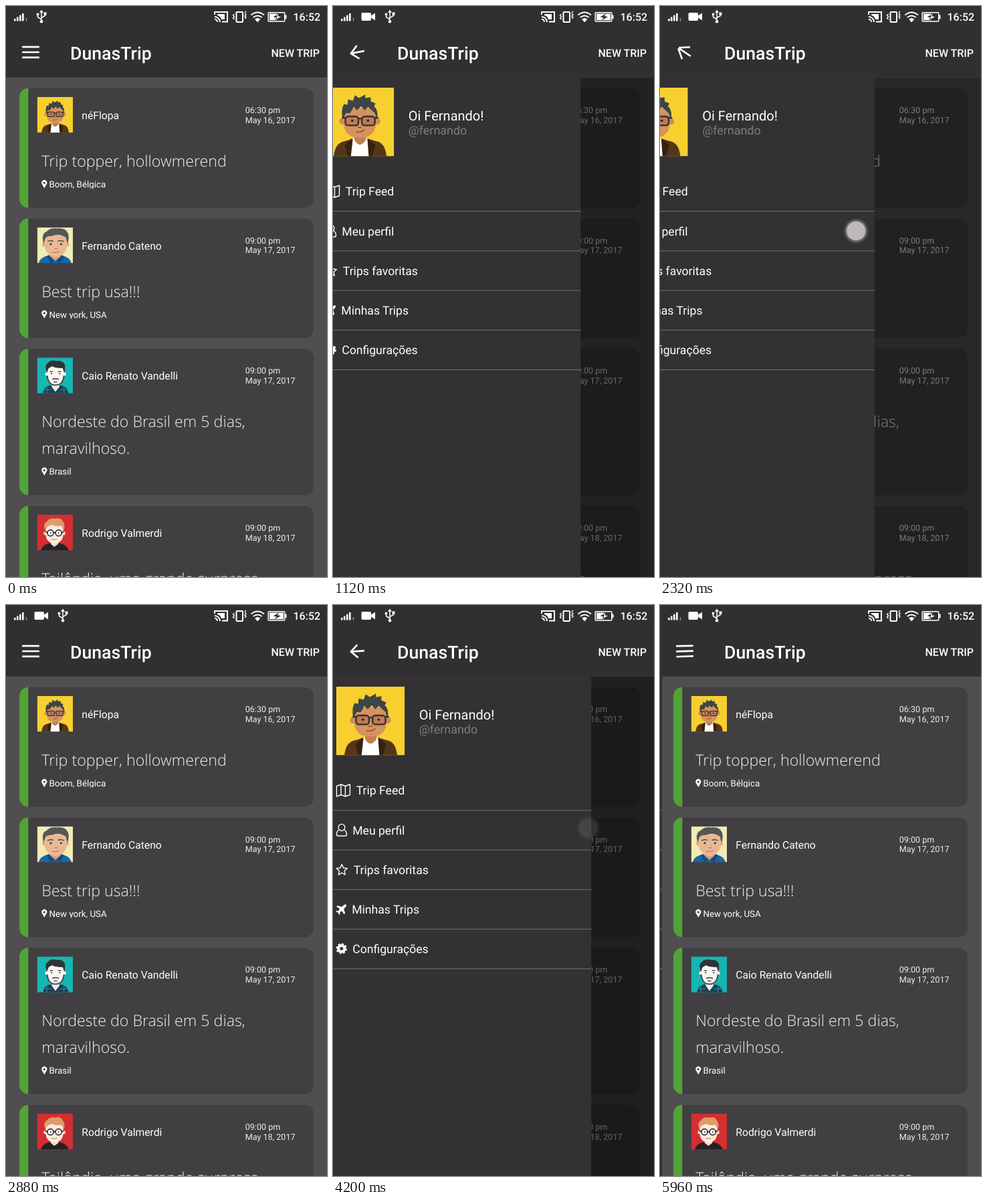
Write an HTML page that moves like this. It is 480x853 px and loops after 6000 ms.

```html
<!DOCTYPE html>
<html lang="pt">
<head>
<meta charset="utf-8">
<title>DunasTrip</title>
<style>
  html, body { margin: 0; width: 100%; height: 100%; overflow: hidden; background: #504e50; }
  svg { font-family: Roboto, sans-serif; fill: #fff; text-rendering: geometricPrecision; }
  body > svg { display: block; width: 480px; height: 853px; }
  .line { fill: none; stroke: #fff; }
  .name { font-size: 15.7px; }
  .date { font-size: 12.6px; fill: #eee; }
  .trip { font: 300 23.2px "Open Sans", sans-serif; fill: #f2f2f2; }
  .place { font-size: 13.33px; }
  .menu { font-size: 17.6px; }
</style>
</head>
<body>
<svg viewBox="0 0 480 853">
  <defs>
    <symbol id="yellow" viewBox="0 0 100 100">
      <path fill="#f7d02f" d="M0 0h100v100H0z"/>
      <path fill="#563619" d="M12 100Q14 80 28 78L42 74H60L74 78Q87 80 89 100Z"/>
      <path fill="#37210f" d="M38 74L28 84 33 100H42ZM62 74L73 84 68 100H59Z"/>
      <path fill="#fff" d="M40 74H61L63 100H37Z"/>
      <path fill="#c47f51" d="M42 64H59V76Q50 90 42 76Z"/>
      <circle cx="25" cy="49" r="5" fill="#cf8b5b"/><circle cx="75" cy="49" r="5" fill="#cf8b5b"/>
      <path fill="#d6925f" d="M26 30H74V50Q73 73 50 73 27 73 26 50Z"/>
      <path fill="#3d4546" d="M25 46Q22 32 27 24L32 25 33 17 40 19 43 11 49 15 58 10 58 15 66 14 66 20 73 23 71 27Q78 34 75 46L72 37 62 28 57 33 52 27 46 33 41 28 36 37 30 37Z"/>
      <g fill="#c07b4d" stroke="#303233" stroke-width="2.4"><rect x="29" y="42" width="19" height="13" rx="4"/><rect x="53" y="42" width="19" height="13" rx="4"/><path d="M48 45h5M24 44h5M72 44h5"/></g>
      <circle cx="39" cy="48" r="1.7" fill="#222"/><circle cx="62" cy="48" r="1.7" fill="#222"/>
      <path fill="none" stroke="#8a4d2c" stroke-width="1.5" d="M47 57q3 2 6 0M44 64q8 2 13-3"/>
    </symbol>
    <symbol id="cream" viewBox="0 0 100 100">
      <path fill="#f0ecb4" d="M0 0h100v100H0z"/>
      <path fill="#1766a8" d="M4 100Q8 84 30 79H70Q92 84 96 100Z"/>
      <path fill="#d99a74" d="M36 72H66V82L51 94 36 82Z"/>
      <path fill="#0f4d86" d="M32 77L49 95 38 100 27 82ZM70 77L53 95 64 100 75 82Z"/>
      <circle cx="20" cy="48" r="6" fill="#e3a983"/><circle cx="83" cy="48" r="6" fill="#e3a983"/>
      <path fill="#eab894" d="M20 22H83V55Q80 76 52 85 24 76 21 55Z"/>
      <path fill="#555759" d="M18 46Q10 18 26 12 36 0 56 3 78 0 86 16 91 28 85 46L80 28Q62 16 42 24 28 24 23 30Z"/>
      <path fill="none" stroke="#4a4a4a" stroke-width="3" d="M29 40q9-5 16-1M58 39q8-4 17 1"/>
      <circle cx="38" cy="47" r="3" fill="#444"/><circle cx="67" cy="47" r="3" fill="#444"/>
      <path fill="none" stroke="#b36f50" stroke-width="2" d="M49 59q4 3 8 0M42 69q11 5 20-2"/>
    </symbol>
    <symbol id="teal" viewBox="0 0 100 100">
      <path fill="#16b6b2" d="M0 0h100v100H0z"/>
      <path fill="#1c4257" d="M16 100Q18 82 34 78H68Q86 82 88 100Z"/>
      <path fill="none" stroke="#3b8698" stroke-width="2" d="M27 82v18M75 82v18M18 90h22M63 90h23"/>
      <path fill="#f4eee9" d="M41 68H62V82L51 96 41 82Z"/>
      <circle cx="27" cy="46" r="5" fill="#f4eee9"/><circle cx="76" cy="46" r="5" fill="#f4eee9"/>
      <path fill="#fbf6f1" d="M28 22H75V50Q74 77 51 78 29 77 28 50Z"/>
      <path fill="#303338" d="M27 42Q19 20 29 16 36 5 54 9 74 7 78 22 79 34 76 42L71 29Q55 31 41 24L32 30Z"/>
      <path fill="none" stroke="#3c3f43" stroke-width="3.5" d="M28 50Q31 77 51 77 72 77 75 50"/>
      <path fill="none" stroke="#34373a" stroke-width="2.5" d="M35 39h9M58 39h9M42 61q9-4 19 0M46 68h10"/>
      <circle cx="40" cy="45" r="2" fill="#333"/><circle cx="63" cy="45" r="2" fill="#333"/>
    </symbol>
    <symbol id="red" viewBox="0 0 100 100">
      <path fill="#d32f33" d="M0 0h100v100H0z"/>
      <path fill="#232225" d="M10 100Q14 84 32 80H64Q84 84 88 100Z"/>
      <path fill="#f6dcc8" d="M38 70H59V82L48 90 38 82Z"/>
      <circle cx="23" cy="52" r="5" fill="#f6dcc8"/><circle cx="74" cy="52" r="5" fill="#f6dcc8"/>
      <path fill="#fcebdd" d="M24 26H73V54Q72 79 48 81 25 79 24 54Z"/>
      <path fill="#df9c6b" d="M23 44Q15 24 27 19 34 8 50 11 66 6 72 19 80 28 74 44L68 31Q52 35 42 28L29 33Z"/>
      <g fill="#fff" stroke="#29282a" stroke-width="3"><circle cx="37" cy="51" r="8.5"/><circle cx="60" cy="51" r="8.5"/><path d="M45 50h7M23 49h6M68 49h6"/></g>
      <circle cx="38" cy="51" r="2" fill="#333"/><circle cx="60" cy="51" r="2" fill="#333"/>
      <path fill="none" stroke="#b87862" stroke-width="2" d="M41 68q8 4 14 0"/>
    </symbol>
    <path id="bolt" d="M408 11.5l-8.5 5 5 .8-2.5 4 9-5.2-5.200-.9z"/>
    <clipPath id="charged"><rect class="fill" x="394" y="10" height="13"/></clipPath>
    <clipPath id="round"><rect width="440" height="178.7" rx="13.3"/></clipPath>
    <clipPath id="tall"><rect width="440" height="218.7" rx="13.3"/></clipPath>
    <radialGradient id="glow"><stop offset=".6" stop-color="#fff" stop-opacity=".55"/><stop offset="1" stop-color="#fff" stop-opacity="0"/></radialGradient>
  </defs>

  <rect width="480" height="853" fill="#504e50"/>
  <g id="feed"></g>
  <rect id="scrim" y="106.700" width="480" height="747" fill="#000"/>

  <g id="drawer">
    <rect y="106" width="394.5" height="747" fill="#333134"/>
    <use href="#yellow" x="13" y="122" width="102.500" height="102.500"/>
    <text x="137" y="170.500" font-size="20">Oi Fernando!</text>
    <text x="137" y="192.300" font-size="17.900" style="fill:#7e7c7e">@fernando</text>
    <g id="menu"></g>
    <g class="line" stroke-width="1.400" stroke-linejoin="round">
      <path d="M13.700 270.500l6.500-2.500 6.500 2.500 7-2.500v15.500l-7 2.500-6.500-2.500-6.500 2.500zM20.200 268v15.500M26.700 270.500v15.500"/>
      <path d="M17.200 336c-2.500 1.500-3.500 4-3.500 6.500q0 2.500 2.500 2.500h10q2.500 0 2.500-2.500c0-2.500-1-5-3.500-6.500"/>
      <circle cx="21.200" cy="332.300" r="4.900"/>
      <path d="M21.500 387.500l2.400 5.200 5.600.7-4.100 3.900 1 5.600-4.900-2.700-4.900 2.700 1-5.600-4.100-3.900 5.600-.7z"/>
    </g>
    <path d="M28 447.500q-2-1-4.500 1.500l-2 2-6.500-2-1.500 1.500 5 3.500-2.500 3-2.500-.3-1 1.200 3.300 1.700 1.700 3.300 1.200-1-.3-2.500 3-2.500 3.500 5 1.500-1.500-2-6.500 2-2q2.500-2.500 1.600-4.400z"/>
    <circle class="line" cx="21" cy="513.300" r="4.500" stroke-width="4"/>
    <circle class="line" cx="21" cy="513.300" r="6.800" stroke-width="2.600" stroke-dasharray="3 2.340"/>
  </g>

  <rect width="480" height="106.700" fill="#312f32"/>
  <path id="burger" class="line" stroke-width="2.670"/>
  <text x="96" y="79.500" font-size="26.670" font-weight="500">DunasTrip</text>
  <text x="396.500" y="75.500" font-size="16" font-weight="500">NEW TRIP</text>

  <g id="status">
    <path d="M12 19h2.600v3.500H12zM16 16.500h2.600v6H16zM20 13.800h2.600v8.700H20zM24 11h2.600v11.500H24z"/>
    <text x="28.800" y="23" font-size="6.500">1</text>
    <path id="camera" d="M44 10h11q2 0 2 2v2.500l6-4v11l-6-4V20q0 2-2 2H44q-1.500 0-1.500-2v-8q0-2 1.500-2z"/>
    <g id="usb">
      <path class="line" stroke-width="1.500" d="M0 9V23M0 20L-5.500 16.500V13M0 17.500L5.500 14.500V12"/>
      <path d="M0 5.500l3 4.500h-6zM3.500 9.500h4v4h-4z"/><circle cx="-5.500" cy="12.500" r="2"/><circle cy="23.300" r="2.300"/>
    </g>
    <g class="line" stroke-width="2">
      <path d="M312 13V9h19v14.500h-8M312 16a8 8 0 0 1 8 8M312 19.800a4 4 0 0 1 4 4"/>
      <rect x="344.500" y="9" width="9.500" height="15" rx="1"/>
      <path stroke-width="1.400" d="M341.500 12l-2 2 2 2-2 2 2 2 M357 10l2-2M357 11l2 2-2 2 2 2-2 2"/>
      <path d="M366.500 13.500q9.700-8 19.400 0M369.800 17q6.400-5 12.800 0M372.800 20.300q3.400-2.600 6.800 0"/>
    </g>
    <path fill="#fff" d="M316 12h11v8h-5q-1-5-6-6zM373 21l3.200 3.300 3.200-3.300q-3.200-2-6.400 0z"/>
    <rect class="line" x="392.200" y="9.700" width="24.500" height="13.300" rx="1" stroke-width="1.500"/>
    <path d="M417 13.500h2.500v5.700H417z"/>
    <use href="#bolt"/>
    <rect class="fill" x="394" y="11.500" height="9.700"/>
    <use href="#bolt" fill="#2b292c" clip-path="url(#charged)"/>
    <text x="429.500" y="22.300" font-size="16" font-weight="500">16:52</text>
  </g>

  <g id="touch"><circle r="19" fill="url(#glow)"/><circle r="14" fill="#bcb8bb"/></g>
</svg>
<script>
const $ = id => document.getElementById(id);
const W = 394.5;

const trips = [
  ['yellow', 'néFlopa', '06:30 pm', 'May 16, 2017', ['Trip topper, hollowmerend'], 'Boom, Bélgica'],
  ['cream', 'Fernando Cateno', '09:00 pm', 'May 17, 2017', ['Best trip usa!!!'], 'New york, USA'],
  ['teal', 'Caio Renato Vandelli', '09:00 pm', 'May 17, 2017', ['Nordeste do Brasil em 5 dias,', 'maravilhoso.'], 'Brasil'],
  ['red', 'Rodrigo Valmerdi', '09:00 pm', 'May 18, 2017', ['Tailândia, uma grande surpresa', 'para todos.'], 'Tailândia']
];
let top_ = 122.7;
$('feed').innerHTML = trips.map(([face, name, hour, day, lines, place]) => {
  const extra = 40 * (lines.length - 1), y = top_;
  top_ += 194.67 + extra;
  return `<g transform="translate(20 ${y})">
    <g clip-path="url(#${extra ? 'tall' : 'round'})">
      <rect width="440" height="219" fill="#423f42"/><rect width="13.3" height="219" fill="#52a437"/></g>
    <use href="#${face}" x="26.7" y="13.3" width="53.3" height="53.3"/>
    <text class="name" x="93.3" y="46.3">${name}</text>
    <text class="date" x="337.7" y="37.3">${hour}</text><text class="date" x="337.7" y="52">${day}</text>
    ${lines.map((s, i) => `<text class="trip" x="33.3" y="${117.3 + 40 * i}">${s}</text>`).join('')}
    <g transform="translate(0 ${extra})">
      <path fill-rule="evenodd" d="M37.300 149.500l-3-5.500a4 4 0 1 1 6 0zM37.300 140a1.600 1.600 0 1 0 .01 0z"/>
      <svg x="44.500" y="135" width="300" height="15"><text class="place" y="13.300">${place}</text></svg>
    </g></g>`;
}).join('');

$('menu').innerHTML = [['Trip Feed', 43], ['Meu perfil', 37.5], ['Trips favoritas', 39], ['Minhas Trips', 36.5], ['Configurações', 37.5]]
  .map(([s, x], i) => `<text class="menu" x="${x}" y="${283.4 + 59.1 * i}">${s}</text>
    <rect y="${306.2 + 59.17 * i}" width="${W}" height="1" fill="#747274"/>`).join('');

const clamp = u => Math.max(0, Math.min(1, u));
const span = (t, start, length) => clamp((t - start) / length);
const settle = (t, start, length) => 1 - (1 - span(t, start, length)) ** 5;
const smooth = u => u * u * (3 - 2 * u);

// Right edge of the drawer: tap open, drag shut, swipe open, drag shut
function edgeAt(t) {
  if (t < 1800) return W * settle(t, 902, 512);
  if (t < 2420) return W - 100 * span(t, 1880, 540) ** 1.5;
  if (t < 3600) return (W - 100) * (1 - settle(t, 2420, 450));
  if (t < 4180) return 384 * smooth(span(t, 3600, 570));
  if (t < 5120) return 384 + (W - 384) * settle(t, 4180, 450);
  if (t < 5720) return W - 264 * span(t, 5160, 560) ** 1.5;
  return (W - 264) * (1 - settle(t, 5720, 460));
}

// Menu bars that turn into a back arrow
function drawBurger(p, closing) {
  const mix = (a, b) => a + (b - a) * p;
  const angle = mix(0, Math.PI / 4), head = mix(25.6, 14.8), shaft = mix(25.6, 21.6);
  const cut = mix(0, .95), off = mix(7.8, -.95), left = -shaft / 2;
  const w = head * Math.cos(angle), h = head * Math.sin(angle);
  $('burger').setAttribute('d', `M${left + cut} 0h${shaft - 2 * cut}M${left} ${off}l${w} ${h}M${left} ${-off}l${w} ${-h}`);
  $('burger').setAttribute('transform', `translate(37 69) rotate(${mix(-180, 0) * (closing ? -1 : 1)})`);
}

// Press time, release time, offset from the drawer edge, y at start and end
const touches = [[720, 860, 50, 71, 71], [1840, 2420, -27.5, 336, 336], [3320, 4115, 8, 323, 333], [5120, 5720, -27.5, 336, 336]];
const charge = [[0, 405], [400, 410], [760, 415], [1400, 405], [1480, 410], [1800, 415], [2300, 405], [2800, 415],
  [3320, 405], [4440, 410], [4880, 415], [5800, 405]];

function draw(t) {
  const edge = edgeAt(t), p = edge / W;
  $('drawer').setAttribute('transform', `translate(${edge - W} 0)`);
  $('scrim').setAttribute('opacity', .6 * p);
  drawBurger(p, t > 1420 && t < 2900 || t > 4640);

  const recording = t >= 40;
  $('camera').style.display = recording ? '' : 'none';
  $('usb').setAttribute('transform', `translate(${recording ? 85 : 53} 0)`);
  const level = charge.findLast(c => c[0] <= t)[1];
  document.querySelectorAll('.fill').forEach(r => r.setAttribute('width', level - 394));

  const press = touches.findLast(c => c[0] <= t);
  $('touch').style.display = press ? '' : 'none';
  if (press) {
    const [start, end, dx, y0, y1] = press;
    const y = y0 + (y1 - y0) * span(t, start, end - start);
    $('touch').setAttribute('transform', `translate(${edgeAt(Math.min(t, end)) + dx} ${y})`);
    $('touch').setAttribute('opacity', 1 - span(t, end, 100));
  }
}

function frame() {
  draw(performance.now() % 6000);
  requestAnimationFrame(frame);
}
frame();
</script>
</body>
</html>
```
